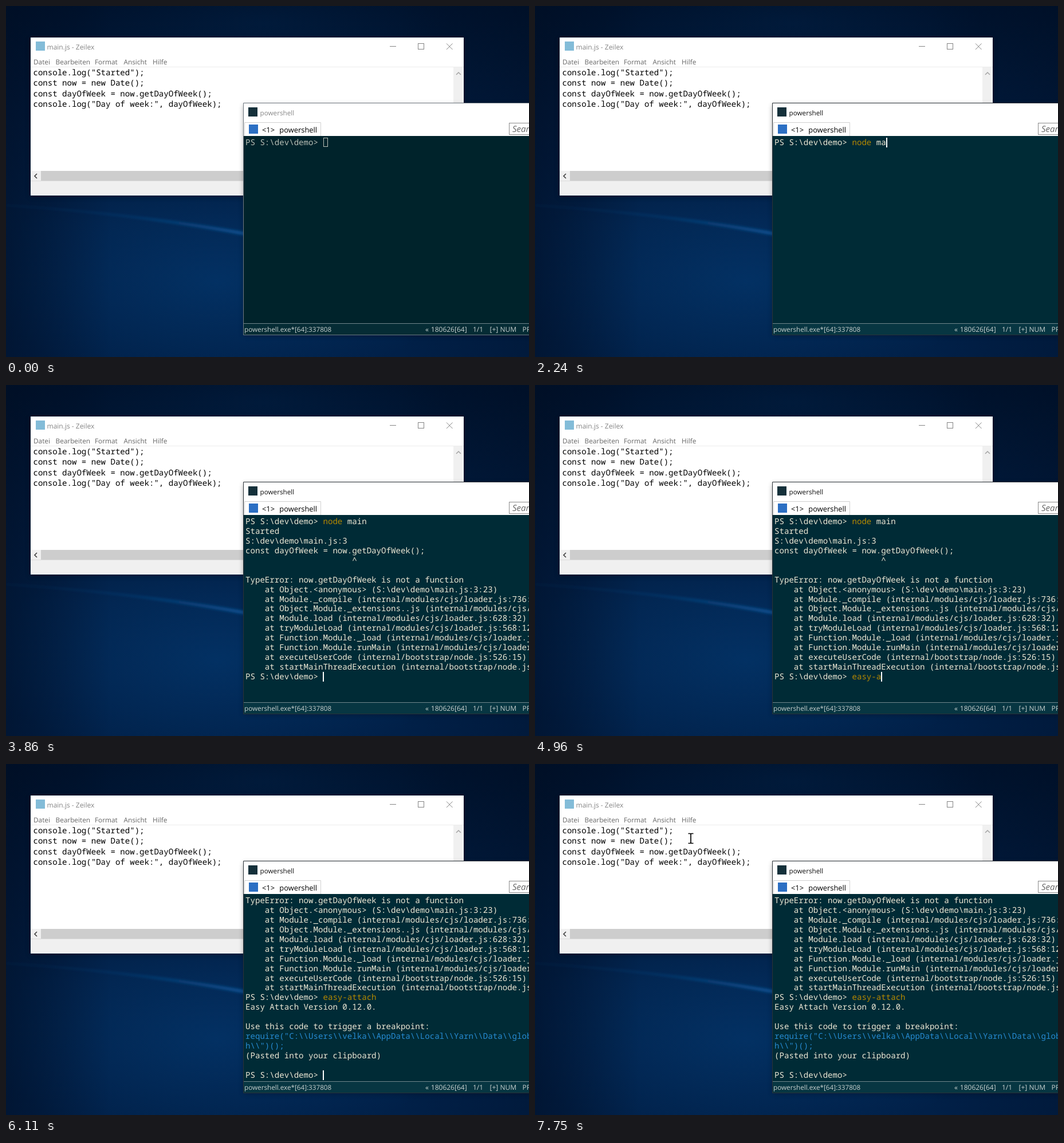
These frames come from a looping animation (913 px wide and 613 px high, 8000 ms). An HTML page:

```html
<!DOCTYPE html>
<html lang="de">
<head>
<meta charset="utf-8">
<title>Terminal demo</title>
<style>
  html, body { margin: 0; width: 100%; height: 100%; overflow: hidden; background: #01193a; }
  svg { display: block; width: 913px; height: 613px; }
  text { font-family: "Open Sans", "Noto Sans", sans-serif; text-rendering: geometricPrecision; white-space: pre; }
  .mono text { font-family: "Noto Sans Mono", "DejaVu Sans Mono", monospace; }
  #code { font-size: 14.07px; }
  #lines { font-size: 14.11px; }
  .menu { font-size: 11.8px; fill: #666; }
  .status { font-size: 12px; fill: #c9d1cf; }
  #proc { font-size: 11.7px; }
  #pointer { mix-blend-mode: difference; }

  /* colours of the unfocused and the focused terminal */
  #term { --bg: #00232b; --bar: #052c35; --text: #b9bfb6; }
  #term.on { --bg: #002b36; --bar: #073642; --text: #eee8d5; }
  #screen { fill: var(--bg); }
  #bar { fill: var(--bar); }
  #lines { fill: var(--text); }
  #title { fill: #888; }
  #frame { stroke: #6f7880; }
  #term.front #title { fill: #111; }
  #term.front #frame { stroke: #2b3238; }
</style>
</head>
<body>
<svg viewBox="0 0 913 613">
  <defs>
    <linearGradient id="sky" x2="0" y2="1">
      <stop offset="0" stop-color="#00122c"/>
      <stop offset=".3" stop-color="#011a3c"/>
      <stop offset=".62" stop-color="#02224b"/>
      <stop offset="1" stop-color="#012048"/>
    </linearGradient>
    <radialGradient id="glow">
      <stop offset="0" stop-color="#04407c" stop-opacity=".5"/>
      <stop offset="1" stop-color="#04407c" stop-opacity="0"/>
    </radialGradient>
    <linearGradient id="edge">
      <stop offset="0" stop-color="#000c20" stop-opacity=".5"/>
      <stop offset=".2" stop-color="#000c20" stop-opacity="0"/>
      <stop offset=".75" stop-color="#000c20" stop-opacity="0"/>
      <stop offset="1" stop-color="#000c20" stop-opacity=".3"/>
    </linearGradient>
    <linearGradient id="beam" gradientUnits="userSpaceOnUse" x1="0" x2="430" y1="0" y2="0">
      <stop offset="0" stop-color="#0a4a88" stop-opacity=".15"/>
      <stop offset=".5" stop-color="#0a4a88" stop-opacity=".4"/>
      <stop offset="1" stop-color="#0d579a" stop-opacity=".9"/>
    </linearGradient>
    <filter id="soft" x="-10%" y="-50%" width="120%" height="200%"><feGaussianBlur stdDeviation="2"/></filter>
    <filter id="shade" x="-10%" y="-10%" width="120%" height="120%"><feGaussianBlur stdDeviation="5"/></filter>
  </defs>

  <rect width="913" height="613" fill="url(#sky)"/>
  <ellipse cx="370" cy="480" rx="400" ry="200" fill="url(#glow)"/>
  <ellipse cx="450" cy="30" rx="330" ry="90" fill="url(#glow)" opacity=".3"/>
  <rect width="913" height="613" fill="url(#edge)"/>
  <path d="M0 349Q210 362 430 403L430 397Q250 364 0 347Z" fill="url(#beam)" filter="url(#soft)"/>

  <g id="notepad">
    <rect x="43" y="58" width="756" height="275" opacity=".35" filter="url(#shade)"/>
    <rect x="43" y="55" width="756" height="276" fill="#fff"/>
    <rect x="52" y="62" width="16" height="16" fill="#83bcd8"/>
    <text x="71.5" y="75.5" font-size="12" fill="#858585">main.js - Zeilex</text>
    <g fill="none" stroke="#858585">
      <path d="M670 70.5h11M769 65.5l10.5 10.5m0-10.5l-10.5 10.5"/>
      <rect x="719.5" y="65.5" width="10" height="10"/>
    </g>
    <g class="menu">
      <text x="48" y="101.5">Datei</text>
      <text x="86.5" y="101.5">Bearbeiten</text>
      <text x="155" y="101.5">Format</text>
      <text x="205.5" y="101.5">Ansicht</text>
      <text x="256" y="101.5">Hilfe</text>
    </g>
    <path d="M43 106.5h756" stroke="#ececec"/>
    <rect x="781" y="107" width="17" height="181" fill="#f0f0f0"/>
    <path d="M786 120l4-4 4 4" fill="none" stroke="#a3a3a3" stroke-width="1.5"/>
    <rect x="43" y="288" width="755" height="17" fill="#f0f0f0"/>
    <rect x="61" y="288" width="700" height="17" fill="#cdcdcd"/>
    <path d="M54 293l-4 4 4 4" fill="none" stroke="#444" stroke-width="1.7"/>
    <rect x="43" y="306" width="756" height="25" fill="#f0f0f0"/>
    <path d="M43 305.5h756" stroke="#dcdcdc"/>
    <g id="code" class="mono">
      <text x="47.5" y="121">console.log("Started");</text>
      <text x="47.5" y="139.4">const now = new Date();</text>
      <text x="47.5" y="157.8">const dayOfWeek = now.getDayOfWeek();</text>
      <text x="47.5" y="176.2">console.log("Day of week:", dayOfWeek);</text>
    </g>
  </g>

  <g id="term">
    <rect x="415" y="173" width="520" height="402" opacity=".35" filter="url(#shade)"/>
    <rect x="415" y="170" width="520" height="57" fill="#fff"/>
    <rect x="423" y="177" width="16" height="16" fill="#14303a"/>
    <text id="title" x="443.5" y="190.5" font-size="11.7">powershell</text>
    <path d="M416.5 227V203.5H549.5V227" fill="#fff" stroke="#d0d0d0"/>
    <rect x="424" y="207" width="16" height="16" fill="#2c6fc3"/>
    <g font-size="12.9">
      <text x="447" y="220.5">&lt;1&gt;</text>
      <text x="477.3" y="220.5">powershell</text>
    </g>
    <rect x="878.5" y="204.5" width="60" height="20" fill="#fff" stroke="#8a8a8a"/>
    <text x="884" y="220" font-size="15" font-style="italic" fill="#666">Search</text>
    <rect id="screen" x="415" y="227" width="498" height="328"/>
    <rect id="bar" x="415" y="555" width="498" height="19"/>
    <path d="M415 554.5h498" stroke="#71878c"/>
    <g class="status">
      <text id="proc" x="416" y="569.3"></text>
      <text x="732" y="569.3">«</text>
      <text x="741.8" y="569.3">180626[64]</text>
      <text x="815" y="569.3">1/1</text>
      <text x="844.5" y="569.3">[+] NUM</text>
      <text x="901.5" y="569.3">PRI</text>
    </g>
    <g id="lines" class="mono"></g>
    <rect id="idle" x="554.5" y="230.5" width="7" height="15" fill="none" stroke="#b9bfb6"/>
    <rect id="caret" width="2" height="17" fill="#fff"/>
    <path id="frame" d="M913 169.5H414.5V574.5H913" fill="none"/>
  </g>

  <path id="pointer" d="M-4.5-8.5h3.5l1 1 1-1h3.5M0-7.5V7.5M-4.5 8.5h3.5l1-1 1 1h3.5" fill="none" stroke="#fff" stroke-width="1.7"/>
</svg>

<script>
const $ = id => document.getElementById(id);
const LOOP = 8000, LEFT = 418, COL = 8.466, TOP = 243, ROW = 16.94;
const PROMPT = String.raw`PS S:\dev\demo> `;

// [time, characters typed so far]
const nodeKeys = [[1540, 1], [1620, 2], [1770, 3], [1920, 5], [2150, 6], [2240, 7], [2300, 8], [2390, 9]];
const attachKeys = [[4090, 2], [4260, 3], [4320, 4], [4720, 5], [4960, 6], [5100, 7],
  [5180, 8], [5260, 9], [5330, 10], [5500, 11]];
const caretOff = [[0, 590], [1140, 1540], [3310, 3860], [6650, 7200], [7750, LOOP]];

const trace = String.raw`Started
S:\dev\demo\main.js:3
const dayOfWeek = now.getDayOfWeek();
                      ^

TypeError: now.getDayOfWeek is not a function
    at Object.&lt;anonymous&gt; (S:\dev\demo\main.js:3:23)
    at Module._compile (internal/modules/cjs/loader.js:736:27)
    at Object.Module._extensions..js (internal/modules/cjs/loader.js:747:10)
    at Module.load (internal/modules/cjs/loader.js:628:32)
    at tryModuleLoad (internal/modules/cjs/loader.js:568:12)
    at Function.Module._load (internal/modules/cjs/loader.js:560:3)
    at Function.Module.runMain (internal/modules/cjs/loader.js:801:12)
    at executeUserCode (internal/bootstrap/node.js:526:15)
    at startMainThreadExecution (internal/bootstrap/node.js:439:3)`.split("\n");

const paint = (s, color) => `<tspan fill="${color}">${s}</tspan>`;
const ochre = s => paint(s, "#b58900"), blue = s => paint(s, "#268bd2");

const notice = [
  "Easy Attach Version 0.12.0.", "", "Use this code to trigger a breakpoint:",
  blue(String.raw`require("C:\\Users\\velka\\AppData\\Local\\Yarn\\Data\\global\\node_modules`),
  blue(String.raw`h\\")();`), "(Pasted into your clipboard)", ""
];

const typed = (keys, t) => keys.reduce((n, [at, count]) => t >= at ? count : n, 0);

// Lines on screen and the caret cell at time t
function terminal(t) {
  const n = typed(nodeKeys, t), m = typed(attachKeys, t), word = "node main".slice(0, n);
  const lines = [PROMPT + ochre(word.slice(0, 4)) + word.slice(4)];
  if (t < 2620) return { lines, col: 16 + n, row: 0 };
  if (t < 2700) return { lines, col: 0, row: 1 };
  lines.push(...trace);
  if (t < 2780) return { lines, col: 0, row: 16 };
  lines.push(PROMPT + ochre("easy-attach".slice(0, m)));
  if (t < 5870) return { lines, col: 16 + m, row: 16 };
  if (t < 6110) return { lines, col: 0, row: 17 };
  lines.push(...notice, PROMPT);
  return { lines: lines.slice(6), col: 16, row: 18 };
}

function pointerAt(t) {
  if (t >= 7750) return [272, 130];
  const u = Math.floor((t - 6880) / 78.5) / 7;
  const s = 1 - (1 - Math.min(u, 1)) ** 2;
  const curve = (a, b, c) => (1 - s) ** 2 * a + 2 * s * (1 - s) * b + s * s * c;
  return [curve(824, 450, 275), curve(215, 63, 131)];
}

const show = (el, on) => el.setAttribute("visibility", on ? "visible" : "hidden");
let shown = "";

function render(t) {
  const { lines, col, row } = terminal(t);
  const markup = lines.map((s, i) => `<text x="${LEFT}" y="${TOP + i * ROW}">${
    s.replace(/^ +/, pad => "\u00a0".repeat(pad.length))}</text>`).join("");
  if (markup !== shown) $("lines").innerHTML = shown = markup;

  $("term").classList.toggle("on", t >= 590);
  $("term").classList.toggle("front", t >= 690);
  $("proc").textContent = t >= 2700 && t < 3250 ? "node.exe[64]:327800" : "powershell.exe*[64]:337808";

  show($("idle"), t < 590);
  show($("caret"), !caretOff.some(([a, b]) => t >= a && t < b));
  $("caret").setAttribute("x", Math.round(LEFT + col * COL));
  $("caret").setAttribute("y", Math.round(TOP - 13.2 + row * ROW));

  show($("pointer"), t >= 6880);
  $("pointer").setAttribute("transform", `translate(${pointerAt(t).map(Math.round)})`);
}

const start = performance.now();
function tick() {
  render((performance.now() - start) % LOOP);
  requestAnimationFrame(tick);
}
tick();
</script>
</body>
</html>
```
